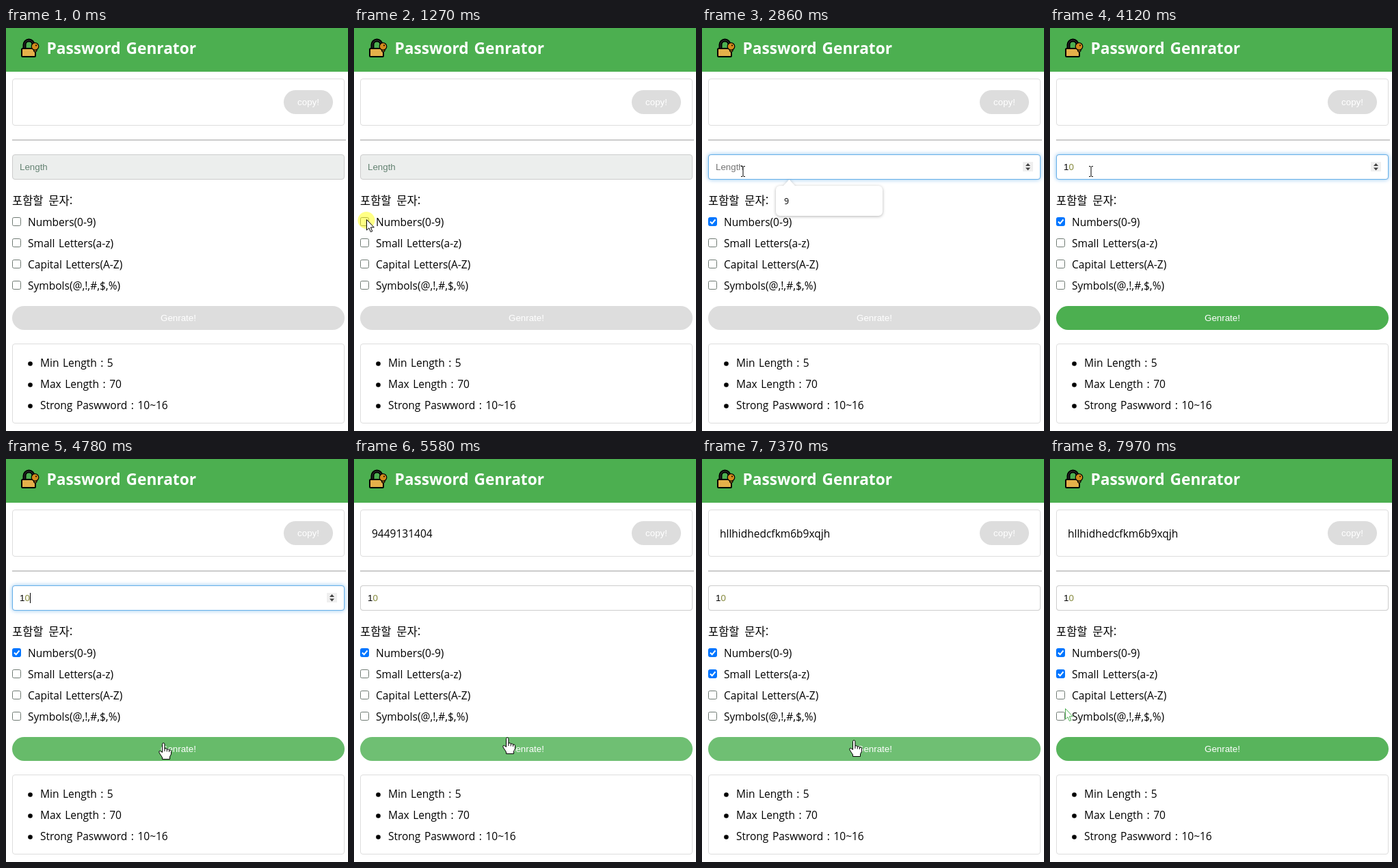
These frames come from a looping animation (500 px wide and 590 px high, 8000 ms). An HTML page:

```html
<!DOCTYPE html>
<html lang="ko">
<head>
<meta charset="utf-8">
<title>Password Genrator</title>
<style>
  html, body { margin: 0; width: 100%; height: 100%; overflow: hidden; background: #fff; }
  svg { display: block; }
  text { font: 15.5px "Open Sans", "Noto Sans", sans-serif; word-spacing: 1.5px; white-space: pre; }
  .title { font-size: 22.7px; font-weight: 700; fill: #fff; word-spacing: 2px; }
  .ko { font: 16.5px "Noto Sans CJK KR", "Noto Sans CJK", sans-serif; word-spacing: 3.2px; }
  .form { font: 13.333px "Liberation Sans", Arial, sans-serif; word-spacing: 0; }
  .label { fill: #fff; text-anchor: middle; }
  .card { fill: #fff; stroke: #ddd; }
  .focus { fill: #fff; stroke: #66afe9; filter: drop-shadow(0 0 3px rgba(102, 175, 233, .75)); }
  .popup { fill: #fff; filter: drop-shadow(0 1px 2px rgba(0, 0, 0, .3)); }
  .cursor { stroke: #000; stroke-linejoin: round; fill: #fff; }
  #beam { fill: none; }
</style>
</head>
<body>
<svg width="500" height="590" viewBox="0 0 500 590">
  <rect width="500" height="64" fill="#4caf50"/>
  <g stroke="#000" stroke-width="2" stroke-linejoin="round">
    <path d="M27 30V24.500a6.500 6.500 0 0 1 13 0V30" fill="none" stroke-width="5"/>
    <path d="M27 30V24.500a6.500 6.500 0 0 1 13 0V30" fill="none" stroke="#3c3c3c" stroke-width="1"/>
    <rect x="23" y="30" width="20" height="12" rx="1.5" fill="#e5b04a"/>
    <path d="M40.500 28V33.500L42.500 35.500L45 33.500V30" fill="#c9851c" stroke-width="1.2"/>
    <circle cx="42.500" cy="27" r="5.300" fill="#d18a1c" stroke-width="1.2"/>
    <circle cx="44" cy="25.500" r="1" stroke="none"/>
  </g>
  <text class="title" x="59.500" y="38">Password Genrator</text>

  <rect class="card" x="9.5" y="74.5" width="485" height="68" rx="3.5"/>
  <text x="26" y="115" data-on="4980-7240">9449131404</text>
  <text x="26" y="115" data-on="7240-8000">hllhidhedcfkm6b9xqjh</text>
  <rect x="406" y="91" width="72" height="35" rx="17.5" fill="#ddd"/>
  <text class="form label" x="442" y="113">copy!</text>
  <rect x="9" y="163" width="488" height="2" fill="#ccc"/>

  <rect x="9.5" y="185.5" width="485" height="36" rx="3.5" fill="#eceeed" stroke="#ccc"/>
  <rect x="9.5" y="185.5" width="485" height="36" rx="3.5" fill="#fff" stroke="#ccc" data-on="1330-8000"/>
  <rect class="focus" x="9.5" y="185.5" width="485" height="36" rx="3.5" data-on="2260-4840"/>
  <text class="form" x="20" y="208" fill="#648272" data-on="0-1330">Length</text>
  <text class="form" x="20" y="208" fill="#757575" data-on="1330-3490">Length</text>
  <text class="form" x="20" y="208" data-on="3490-8000">1</text>
  <text class="form" x="27.4" y="208" fill="#85893c" data-on="3590-8000">0</text>
  <rect x="20" y="196" width="1" height="15" data-on="2330-2860,3390-3490"/>
  <rect x="28" y="196" width="1" height="15" data-on="3490-3590"/>
  <rect x="35" y="196" width="1" height="15" data-on="3590-4120,4650-4840"/>
  <g data-on="1880-4840">
    <rect x="469" y="196" width="15" height="14" fill="#efefef"/>
    <path d="M473 202L476.5 198L480 202ZM473 204.5H480L476.5 208.5Z" fill="#404040"/>
  </g>

  <text class="ko" x="9" y="259">포함할 문자:</text>
  <g id="options"></g>

  <rect id="button" x="9" y="407" width="486" height="35" rx="17.5"/>
  <text class="form label" x="252" y="429">Genrate!</text>

  <rect class="card" x="9.5" y="462.5" width="485" height="116" rx="3.5"/>
  <g id="hints"></g>

  <g data-on="2330-3490">
    <path class="popup" d="M114 231H119L127.5 222L136 231H258a6 6 0 0 1 6 6V269a6 6 0 0 1-6 6H114a6 6 0 0 1-6-6V237a6 6 0 0 1 6-6Z"/>
    <text x="120" y="258" style="font-size:12.5px">9</text>
  </g>

  <g id="pointer" data-on="200-8000">
    <circle cy="1.5" r="12.5" fill="#ffff33" fill-opacity=".6"
      data-on="1200-1400,2260-2400,4840-4980,6310-6450,7170-7240"/>
    <path id="arrow" class="cursor" d="M.5 .5V16L4 12.8L6.4 18.5L8.8 17.5L6.4 11.9H11.3Z"/>
    <path id="beam" class="cursor" d="M-3-7.5H-1L0-6.5L1-7.5H3M0-6.5V6.5M-3 7.5H-1L0 6.5L1 7.5H3"/>
    <path id="hand" class="cursor" d="M-1.5 1.5a1.7 1.7 0 0 1 3.4 0V8q3-1 3.4 1q2.8-.8 3.2 1q3-.5 3 1.8V16L9.5 20V23.5H-1.5V21L-6 14q-1-3 1.5-2.6L-1.5 13.5ZM1.9 8V12M5.3 9V12.5M8.5 10V13"/>
  </g>
</svg>
<script>
const LOOP = 8000;
const $ = id => document.getElementById(id);

// label, time it gets ticked
const options = [
  ["Numbers(0-9)", 1330],
  ["Small Letters(a-z)", 6380],
  ["Capital Letters(A-Z)", LOOP],
  ["Symbols(@,!,#,$,%)", LOOP]
];
const boxTop = i => 277 + 31 * i;
$("options").innerHTML = options.map(([label], i) => {
  const y = boxTop(i);
  return `<rect x="9.5" y="${y + .5}" width="12" height="12" rx="2"/>
    <path d="M12 ${y + 6.5}l2.7 2.8l4.8-5.8" fill="none" stroke="#fff" stroke-width="2"/>
    <text x="32" y="${y + 13}">${label}</text>`;
}).join("");
const boxes = [...$("options").querySelectorAll("rect")];
const ticks = [...$("options").querySelectorAll("path")];

$("hints").innerHTML = ["Min Length : 5", "Max Length : 70", "Strong Paswword : 10~16"].map((hint, i) =>
  `<circle cx="35.5" cy="${491.5 + 31 * i}" r="3.3"/><text x="50" y="${496 + 31 * i}">${hint}</text>`
).join("");

// time, x, y
const path = [
  [200, 440, 582], [780, 26, 250], [930, 18, 280], [1400, 18, 280], [2000, 60, 210],
  [4200, 60, 210], [4700, 238, 426], [4850, 224, 408], [5600, 224, 408], [6180, 21, 314],
  [6710, 21, 314], [7100, 226, 412], [7330, 226, 412], [7790, 56, 404], [7960, 22, 365]
];
// time, opacity of the button
const fade = [[4580, 1], [4840, .8], [5620, .8], [5920, 1], [7070, 1], [7330, .8], [7780, .8], [8000, .95]];

const smooth = p => p * p * (3 - 2 * p);

function sample(track, t, ease = p => p) {
  const next = track.findIndex(key => key[0] > t);
  if (next < 0) return track[track.length - 1].slice(1);
  if (next === 0) return track[0].slice(1);
  const a = track[next - 1], b = track[next];
  const p = ease((t - a[0]) / (b[0] - a[0]));
  return a.slice(1).map((v, i) => v + (b[i + 1] - v) * p);
}

const timed = [...document.querySelectorAll("[data-on]")].map(el => ({
  el, spans: el.dataset.on.split(",").map(s => s.split("-").map(Number))
}));
const show = (el, on) => el.style.display = on ? "" : "none";

function draw(t) {
  for (const { el, spans } of timed) show(el, spans.some(([from, to]) => t >= from && t < to));

  const [x, y] = sample(path, t, smooth);
  const inside = (left, top, right, bottom) => t >= 200 && x >= left && x <= right && y >= top && y <= bottom;

  boxes.forEach((box, i) => {
    const top = boxTop(i);
    const hover = inside(9, top, 22, top + 13);
    const on = t >= options[i][1];
    const color = on ? (hover ? "#005cc8" : "#0075ff") : (hover ? "#4f4f4f" : "#6f7a73");
    box.setAttribute("fill", on ? color : "#fff");
    box.setAttribute("stroke", color);
    show(ticks[i], on);
  });

  const enabled = t >= 3590;
  $("button").setAttribute("fill", enabled ? "#4caf50" : "#ddd");
  $("button").setAttribute("opacity", sample(fade, t)[0]);

  const beam = t >= 1330 && inside(9, 185, 495, 222);
  const hand = enabled && inside(9, 407, 495, 442);
  $("pointer").setAttribute("transform", `translate(${Math.round(x)} ${Math.round(y)})`);
  show($("beam"), beam);
  show($("hand"), hand);
  show($("arrow"), !beam && !hand);
  $("arrow").style.stroke = t >= 7900 ? "#4caf50" : "";
}

const start = performance.now();
function tick() {
  draw((performance.now() - start) % LOOP);
  requestAnimationFrame(tick);
}
tick();
</script>
</body>
</html>
```
